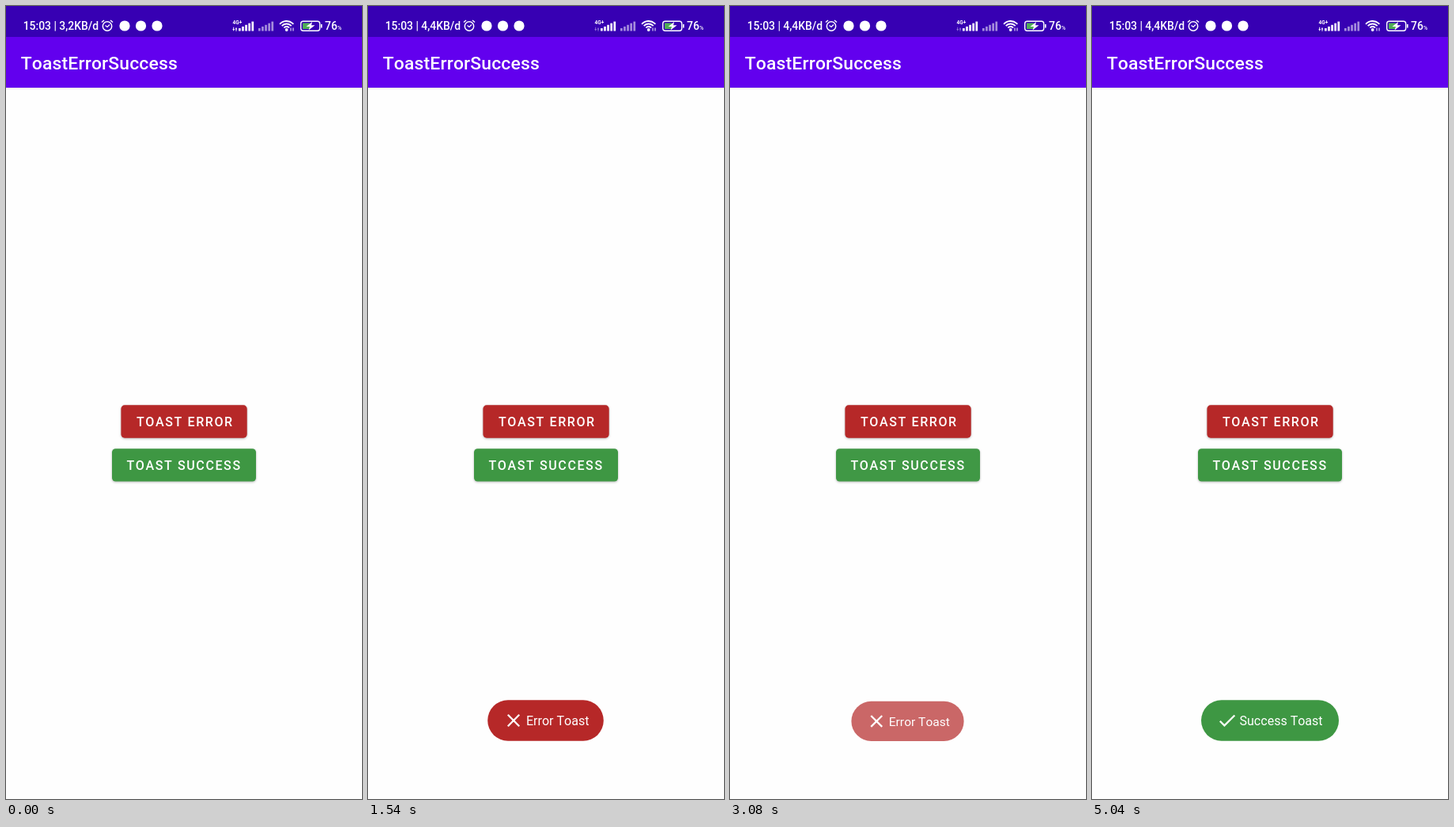
An HTML page with a canvas for the animation above (5.11 s loop, 450 by 1000 pixels).

```html
<!DOCTYPE html>
<html lang="en">
<head>
<meta charset="utf-8">
<title>Toast demo</title>
<style>
html, body { margin: 0; width: 100%; height: 100%; overflow: hidden; background: #fefefe; }
canvas { display: block; }
</style>
</head>
<body>
<canvas id="stage" width="450" height="1000"></canvas>
<script>
const ctx = document.getElementById('stage').getContext('2d');
const LOOP = 5110, TICK = 70;
const RED = '#b62828', GREEN = '#3e9743', WHITE = '#fff';
const BUTTON_H = 41.4;

const buttons = [
  { label: 'TOAST ERROR', x: 145.4, y: 503.3, w: 159.3, textX: 165, color: RED,
    press: 665, release: 900, touch: [298, 508], glow: 0.23 },
  { label: 'TOAST SUCCESS', x: 134, y: 558.2, w: 182, textX: 152.5, color: GREEN,
    press: 2645, release: 2890, touch: [309, 568], glow: 0.12 }
];
const toasts = [
  { label: 'Error Toast', x: 151.2, w: 146.6, textX: 200, color: RED, show: 950, hide: 2990,
    icon: [[[176.8, 893.8], [191.2, 908.2]], [[191.2, 893.8], [176.8, 908.2]]] },
  { label: 'Success Toast', x: 138, w: 174, textX: 186.5, color: GREEN, show: 3230, hide: Infinity,
    icon: [[[161.8, 901.8], [167.4, 907.4], [180.3, 894.5]]] }
];

const clamp = v => Math.max(0, Math.min(1, v));
const ramp = (t, start, span) => clamp((t - start) / span);
const easeOut = p => 1 - (1 - p) ** 2;

function text(str, x, y, size, weight = 400, spacing = 0) {
  ctx.font = `${weight} ${size}px Roboto, sans-serif`;
  ctx.fontKerning = 'none';
  ctx.letterSpacing = spacing + 'px';
  ctx.fillStyle = WHITE;
  ctx.fillText(str, x, y);
}

function roundRect(x, y, w, h, r) {
  ctx.beginPath();
  ctx.roundRect(x, y, w, h, r);
}

function disc(x, y, r) {
  ctx.beginPath();
  ctx.arc(x, y, r, 0, Math.PI * 2);
}

function polyline(points, width) {
  ctx.beginPath();
  points.forEach(p => ctx.lineTo(...p));
  ctx.lineWidth = width;
  ctx.strokeStyle = WHITE;
  ctx.stroke();
}

function polygon(points) {
  ctx.beginPath();
  points.forEach(p => ctx.lineTo(...p));
  ctx.fillStyle = WHITE;
  ctx.fill();
}

function shadow(alpha, blur, dy) {
  ctx.shadowColor = `rgba(0,0,0,${alpha})`;
  ctx.shadowBlur = blur;
  ctx.shadowOffsetY = dy;
}

function signal(x, alpha) {
  ctx.globalAlpha = alpha;
  ctx.fillStyle = WHITE;
  for (let i = 0; i < 5; i++) {
    const h = 3.5 + i * 2.1;
    ctx.fillRect(x + i * 4.1, 31.5 - h, 2.7, h);
  }
  ctx.globalAlpha = 1;
}

function dataArrows(alpha) {
  ctx.globalAlpha = alpha;
  polygon([[286.3, 29], [289.1, 29], [287.7, 31.8]]);
  polygon([[289.6, 29.5], [292.4, 29.5], [291, 26.7]]);
  polyline([[287.7, 26.7], [287.7, 29.5]], 1);
  polyline([[291, 29], [291, 31.8]], 1);
  ctx.globalAlpha = 1;
}

function alarm() {
  ctx.strokeStyle = WHITE;
  ctx.lineWidth = 1.5;
  disc(128, 25.5, 5.7);
  ctx.stroke();
  polyline([[125.5, 24.5], [128, 26.5], [131, 23.5]], 1.3);
  polyline([[121, 20.5], [124, 18]], 1.5);
  polyline([[132, 18], [135, 20.5]], 1.5);
}

function wifi() {
  ctx.strokeStyle = WHITE;
  ctx.lineWidth = 1.8;
  for (const r of [4.5, 8, 11.5]) {
    ctx.beginPath();
    ctx.arc(354.7, 30.5, r, -Math.PI * 0.77, -Math.PI * 0.23);
    ctx.stroke();
  }
  ctx.fillStyle = WHITE;
  disc(354.7, 30, 1.9);
  ctx.fill();
  polyline([[360, 27.5], [360, 31.5]], 1);
  polyline([[363, 27.5], [363, 31.5]], 1);
}

function battery() {
  ctx.strokeStyle = WHITE;
  ctx.lineWidth = 1.4;
  roundRect(372.7, 19.2, 24, 12, 3);
  ctx.stroke();
  ctx.fillStyle = WHITE;
  ctx.fillRect(398, 23, 1.6, 4.5);
  ctx.fillStyle = '#4fae55';
  ctx.fillRect(375, 21.5, 9, 7.5);
  polygon([[387, 20], [379.5, 26], [384, 26], [382.5, 30.5], [390.5, 24.2], [386, 24.2]]);
}

function statusBar(t) {
  ctx.fillStyle = '#3700b3';
  ctx.fillRect(0, 0, 450, 39);
  text(`15:03 | ${t < 1190 ? '3,2' : '4,4'}KB/d`, 21.7, 30, 13.9, 500);
  alarm();
  ctx.fillStyle = WHITE;
  for (const x of [150, 170.5, 191]) {
    disc(x, 25, 6.6);
    ctx.fill();
  }
  text('4G+', 286.5, 22.5, 6.5, 700);
  dataArrows(t < 1190 || t >= 3290 ? 0.95 : 0.4);
  signal(294, 1);
  signal(319, 0.55);
  wifi();
  battery();
  text('76', 403, 30, 13.9, 500);
  text('%', 419, 30, 7, 500);
}

function appBar() {
  ctx.save();
  shadow(0.14, 3, 0.5);
  ctx.fillStyle = '#6200ee';
  ctx.fillRect(0, 39, 450, 64);
  ctx.restore();
  text('ToastErrorSuccess', 18.7, 80, 22.9, 500, 0.17);
}

function drawButton(b, t) {
  const lift = ramp(t, b.press, 150) ** 2 * (1 - ramp(t, b.release, 150));
  ctx.save();
  shadow(0.28, 3 + 6 * lift, 1 + 2.6 * lift);
  ctx.fillStyle = b.color;
  roundRect(b.x, b.y, b.w, BUTTON_H, 4.6);
  ctx.fill();
  ctx.restore();

  const glow = b.glow * ramp(t, b.press, 75) * (1 - ramp(t, b.release, 210));
  if (glow > 0) {
    const p = easeOut(ramp(t, b.press, 225));
    const cx = b.x + b.w / 2, cy = b.y + BUTTON_H / 2;
    ctx.save();
    roundRect(b.x, b.y, b.w, BUTTON_H, 4.6);
    ctx.clip();
    ctx.fillStyle = `rgba(255,255,255,${glow})`;
    disc(b.touch[0] + (cx - b.touch[0]) * p, b.touch[1] + (cy - b.touch[1]) * p,
      Math.hypot(b.w, BUTTON_H) / 2 * p);
    ctx.fill();
    ctx.restore();
  }
  text(b.label, b.textX, b.y + 26.7, 16.04, 500, 1.6);
}

function drawToast(toast, t) {
  const enter = easeOut(ramp(t, toast.show, 240));
  const leave = ramp(t, toast.hide, 300);
  const alpha = enter * (1 - leave);
  if (alpha <= 0) return;

  const scale = 1 - 0.1 * (1 - enter) - 0.1 * leave;
  ctx.save();
  ctx.translate(225, 901 + 14 * (1 - enter) + 3 * leave);
  ctx.scale(scale, scale);
  ctx.translate(-225, -901);
  // White content fading over a white page stays white, so only the pill fades.
  ctx.globalAlpha = alpha;
  ctx.fillStyle = toast.color;
  roundRect(toast.x, 875.2, toast.w, 51.6, 25.8);
  ctx.fill();
  ctx.globalAlpha = 1;
  toast.icon.forEach(line => polyline(line, 2.3));
  text(toast.label, toast.textX, 907, 16.04);
  ctx.restore();
}

function draw(t) {
  ctx.fillStyle = '#fefefe';
  ctx.fillRect(0, 0, 450, 1000);
  appBar();
  statusBar(t);
  buttons.forEach(b => drawButton(b, t));
  toasts.forEach(toast => drawToast(toast, t));
}

const start = performance.now();
function frame() {
  const t = (performance.now() - start) % LOOP;
  draw(Math.floor(t / TICK) * TICK);
  requestAnimationFrame(frame);
}
frame();
</script>
</body>
</html>
```
